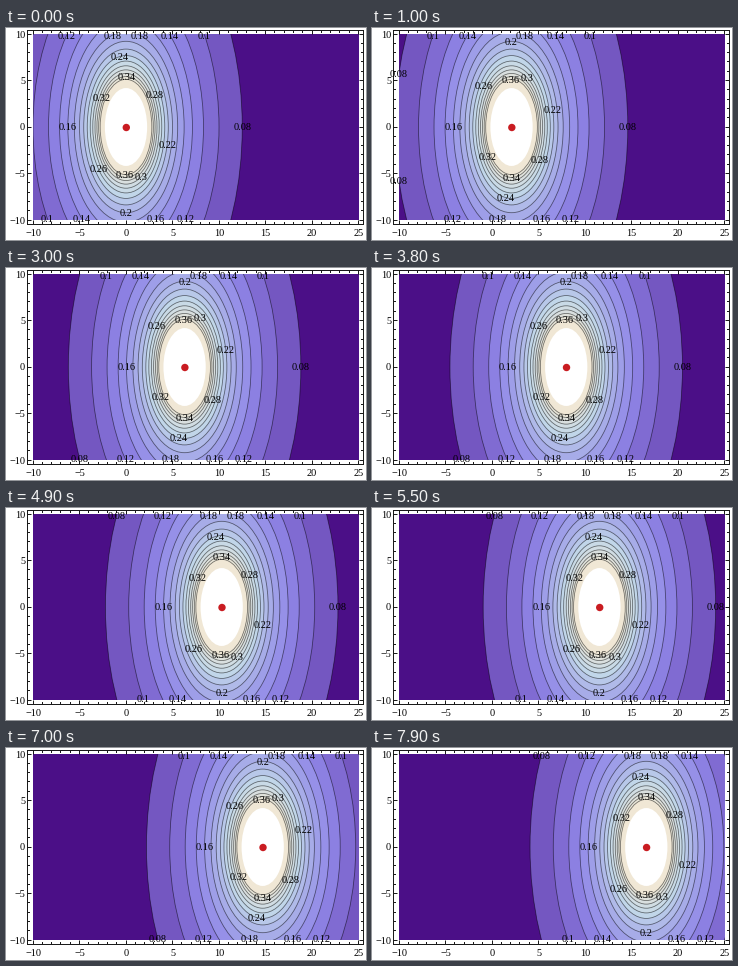
Recreate the animation shown at these times as a matplotlib script. Size 360 by 212 pixels, loop 8000 ms.

```python
import numpy as np
import matplotlib.pyplot as plt
from matplotlib.animation import FuncAnimation
from matplotlib.patches import Ellipse, Rectangle

# Equipotentials 1/sqrt(dx^2 + (1 - v^2) dy^2) of a charge moving at speed v
W, H, DPI = 360, 212, 100
FRAMES, INTERVAL = 80, 100
SPEED, DT = 0.84, 0.25
SQUASH = np.sqrt(1 - SPEED**2)
XMIN, XMAX, YMAX = -10, 25, 10
LEFT, TOP, SCALE = 27, 6, 9.3
LEVELS = np.arange(8, 37, 2) / 100
OPEN, CLOSED = LEVELS[:6], LEVELS[6:]
CUTOFF = 0.44

# Label directions on the closed curves, outermost first
ANGLES = np.radians([270, 347, 99, 219, 32, 300, 147, 89, 267])
LABEL_EDGE = 9.88

LAKE = np.array([(0.293, 0.057, 0.529), (0.564, 0.528, 0.909),
                 (0.763, 0.847, 0.914), (0.941, 0.907, 0.834)])


def px(x):
    return LEFT + (x - XMIN) * SCALE


def py(y):
    return TOP + (YMAX - y) * SCALE


def pt(pixels):
    return pixels * 72 / DPI


def lake(t):
    return [np.interp(t, np.linspace(0, 1, 4), LAKE[:, k]) for k in range(3)]


def half_width(v, y):
    return np.sqrt(1 / v**2 - (SQUASH * y) ** 2)


def open_heights(middle, sign):
    """Alternate between both edges, with one label half way up."""
    for i in range(len(OPEN)):
        if i == middle:
            yield 0
        else:
            yield sign * LABEL_EDGE
            sign = -sign


def label_spots(step):
    cx = step * SPEED * DT
    flip = -1 if step % 4 == 2 else 1
    for side, middle, sign in ((-1, 4, flip), (1, 0, 1)):
        room = XMAX - cx if side > 0 else cx - XMIN
        for v, y in zip(OPEN, open_heights(middle, sign)):
            if half_width(v, 0) <= room + 0.05:
                yield v, cx + side * half_width(v, y), y
            elif half_width(v, YMAX) < room - 0.1:
                # the plot edge splits the curve in two corner pieces
                y = np.sqrt(1 / v**2 - room**2) / SQUASH
                yield v, cx + side * room, y
                yield v, cx + side * room, -y
    for v, a in zip(CLOSED, flip * ANGLES):
        yield v, cx + np.cos(a) / v, np.sin(a) / v / SQUASH


fig = plt.figure(figsize=(W / DPI, H / DPI), dpi=DPI, facecolor="white")
ax = fig.add_axes([0, 0, 1, 1])
ax.set(xlim=(0, W), ylim=(H, 0))
ax.axis("off")

field = Rectangle((LEFT, TOP), (XMAX - XMIN) * SCALE, 2 * YMAX * SCALE,
                  fc=lake(0), ec="none")
ax.add_patch(field)


def add_oval(v, **style):
    oval = Ellipse((0, py(0)), 2 * SCALE / v, 2 * SCALE / v / SQUASH, **style)
    ax.add_patch(oval)
    oval.set_clip_path(field)
    return oval


shades = np.linspace(0.2, 1, len(LEVELS))
ovals = [add_oval(v, fc=lake(t), ec=(0, 0, 0, 0.52), lw=pt(0.8))
         for v, t in zip(LEVELS, shades)]
ovals.append(add_oval(CUTOFF, fc="white", ec="none"))
dot = Ellipse((0, py(0) + 0.5), 7.4, 7.4, fc=(0.79, 0.11, 0.13), ec="none", zorder=7)
ax.add_patch(dot)

# Frame with ticks on all four sides
FX0, FX1, FY0, FY1 = 21.5, 357.5, 2.5, 196.5
FONT = dict(family="Liberation Serif", size=pt(10.3), color="black",
            va="center_baseline", zorder=6)


def line(x0, y0, x1, y1):
    ax.plot([x0, x1], [y0, y1], color="0.1", lw=pt(1), zorder=5, snap=False,
            solid_capstyle="projecting")


def crisp(v):
    return np.floor(v) + 0.5


def tick_size(n):
    return 3.5 if n % 5 == 0 else 2


def number(n):
    return str(n).replace("-", "\u2212") if n % 5 == 0 else ""


for y in (FY0, FY1):
    line(FX0, y, FX1, y)
for x in (FX0, FX1):
    line(x, FY0, x, FY1)
for n in range(XMIN, XMAX + 1):
    x, size = crisp(px(n)), tick_size(n)
    line(x, FY0, x, FY0 + size)
    line(x, FY1, x, FY1 - size)
    ax.text(px(n), 204, number(n), ha="center", **FONT)
for n in range(-YMAX, YMAX + 1):
    y, size = crisp(py(n)), tick_size(n)
    line(FX0, y, FX0 + size, y)
    line(FX1, y, FX1 - size, y)
    ax.text(19.2, py(n), number(n), ha="right", **FONT)

labels = [ax.text(0, 0, "", ha="center", **FONT) for _ in range(26)]


def update(step):
    cx = px(step * SPEED * DT)
    for oval in ovals:
        oval.set_center((cx, py(0)))
    dot.set_center((cx + 0.3, py(0) + 0.5))
    for text in labels:
        text.set_text("")
    for text, (v, x, y) in zip(labels, label_spots(step)):
        text.set_position((px(x), py(y)))
        text.set_text(f"{v:.2g}")
    return [*ovals, dot, *labels]


anim = FuncAnimation(fig, update, frames=FRAMES, interval=INTERVAL,
                     repeat=True, repeat_delay=0, blit=False)
plt.show()
```
